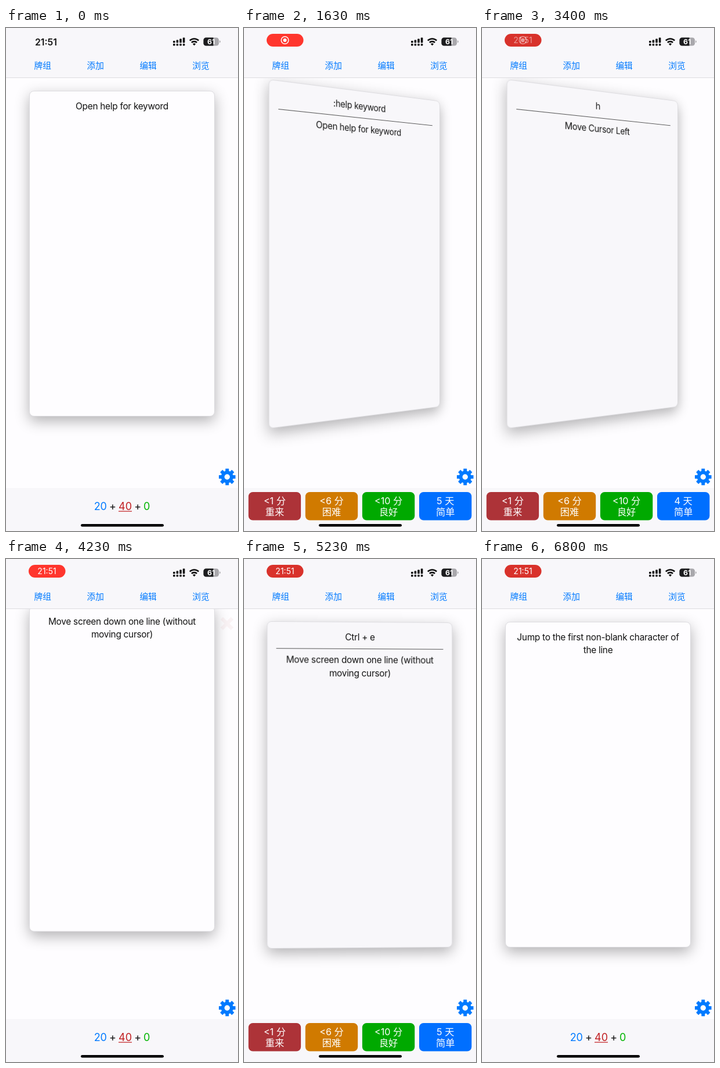
An HTML page that plays this animation: 400x865 px, repeating every 6830 ms.

```html
<!DOCTYPE html>
<html lang="zh-CN">
<head>
<meta charset="utf-8">
<title>Flashcards</title>
<style>
html, body { margin: 0; width: 100%; height: 100%; overflow: hidden; background: #fefdff; }
#stage { position: absolute; left: 0; top: 0; width: 400px; height: 865px; overflow: hidden;
  font-family: Inter, "Noto Sans CJK SC", "Noto Sans CJK", sans-serif; }
.card { position: absolute; left: 40px; top: 107.5px; width: 320px; height: 560.5px; box-sizing: border-box;
  padding: 15px; border: 1px solid #dddce0; border-radius: 8px; background: #fefdff;
  box-shadow: 0 8px 24px rgba(0,0,0,.3); color: #111; text-align: center;
  font-size: 15.4px; line-height: 22.4px; letter-spacing: -.28px; }
.card.back { background: #f8f7fa; }
.card hr { margin: 7.5px 0 8px; border: 0; height: 1.2px; background: #555; }
.card:not(.back) .answer { display: none; }
svg { position: absolute; left: 0; top: 0; }
text { text-anchor: middle; }
.nav { font-size: 14.7px; fill: #007aff; }
.count { font-size: 18px; }
.btn { font-size: 16.2px; fill: #fff; }
</style>
</head>
<body>
<div id="stage">
  <div id="old" class="card"></div>
  <div id="now" class="card"></div>
  <svg width="400" height="865" viewBox="0 0 400 865">
    <path id="cross" d="M372 102l18 18m0-18l-18 18" stroke="#b52b2f" stroke-width="6.4"/>
    <path id="gear" fill="#007aff" fill-rule="evenodd"/>
    <rect width="400" height="85" fill="#f8f7fa"/>
    <rect y="85" width="400" height="1" fill="#dddce0"/>
    <rect y="791" width="400" height="74" fill="#f8f7fa"/>
    <g id="nav" class="nav"></g>

    <text id="clock" x="69" y="29.8" font-size="15.8" font-weight="600" fill="#111">21:51</text>
    <g id="pill">
      <rect id="pillBg" x="39" y="10" width="63.5" height="22" rx="11"/>
      <g id="rec" fill="none" stroke="#fff" stroke-width="1.5">
        <circle cx="70.5" cy="21" r="6.3"/><circle cx="70.5" cy="21" r="3" fill="#fff" stroke="none"/>
      </g>
      <text id="pillTime" x="70.5" y="26" font-size="14" fill="#fff">21:51</text>
    </g>
    <g id="signal" fill="#111"></g>
    <g fill="none" stroke="#111" stroke-width="2.6">
      <path d="M316.8 21.6a11 11 0 0 1 15.4 0"/>
      <path d="M319.9 25a6.6 6.6 0 0 1 9.2 0"/>
      <path d="M324.5 30.2l-2.6-2.8a3.8 3.8 0 0 1 5.2 0z" fill="#111" stroke="none"/>
    </g>
    <clipPath id="cell"><rect x="340.5" y="16.5" width="26.5" height="14" rx="4.3"/></clipPath>
    <g clip-path="url(#cell)">
      <rect x="340" y="16" width="28" height="15" fill="#a9a8ac"/>
      <rect x="340" y="16" width="17.5" height="15" fill="#1c1c1e"/>
    </g>
    <path d="M368 21.3q1.8.6 1.8 2.2t-1.8 2.2z" fill="#a9a8ac"/>
    <text x="353.6" y="28" font-size="12.4" font-weight="700" fill="#fff">61</text>

    <g id="counter" class="count">
      <text x="162.8" y="829" fill="#007aff">20</text>
      <text x="184" y="829" fill="#111">+</text>
      <text x="205.5" y="829" fill="#c11f22">40</text>
      <rect x="194" y="830.5" width="23" height="1.2" fill="#c11f22"/>
      <text x="227.3" y="829" fill="#111">+</text>
      <text x="242.8" y="829" fill="#00b400">0</text>
    </g>
    <g id="buttons"></g>
    <rect x="129" y="853" width="143" height="4.6" rx="2.3" fill="#000"/>
  </svg>
</div>
<script>
const LOOP = 6830, SLIDE = 600, FLIP = 700;
const deck = [
  { q: 'Open help for keyword', a: ':help keyword', days: 5, enter: -SLIDE, flip: 1210 },
  { q: 'Move Cursor Left', a: 'h', days: 4, enter: 2123, flip: 2980 },
  { q: 'Move screen down one line (without moving cursor)', a: 'Ctrl + e', days: 5, enter: 3785, flip: 4540 },
  { q: 'Jump to the first non-blank character of the line', a: '^', days: 5, enter: 5650, flip: Infinity }
];
const $ = id => document.getElementById(id);
const clamp = v => Math.max(0, Math.min(1, v));
const show = (el, on) => { el.style.display = on ? '' : 'none'; };

function bezier(x1, y1, x2, y2) {
  const at = (u, a, b) => 3 * u * (1 - u) * ((1 - u) * a + u * b) + u * u * u;
  return x => {
    if (x <= 0 || x >= 1) return clamp(x);
    let lo = 0, hi = 1;
    for (let i = 0; i < 30; i++) {
      const mid = (lo + hi) / 2;
      if (at(mid, x1, x2) < x) lo = mid; else hi = mid;
    }
    return at(lo, y1, y2);
  };
}
const ease = bezier(.25, .1, .25, 1);
const spring = bezier(.175, .885, .32, 1.38);

function gearPath(cx, cy) {
  const pts = [];
  for (let i = 0; i < 8; i++) {
    for (const [r, d] of [[10.6, -.29], [14.6, -.2], [14.6, .2], [10.6, .29]]) {
      const a = i * Math.PI / 4 + d;
      pts.push((cx + r * Math.cos(a)).toFixed(2) + ' ' + (cy + r * Math.sin(a)).toFixed(2));
    }
  }
  const h = 4.7;
  return `M${pts.join('L')}Z M${cx - h} ${cy}a${h} ${h} 0 1 0 ${2 * h} 0a${h} ${h} 0 1 0 ${-2 * h} 0Z`;
}

$('gear').setAttribute('d', gearPath(381.3, 772));
$('nav').innerHTML = ['牌组', '添加', '编辑', '浏览']
  .map((s, i) => `<text x="${63.3 + 90.9 * i}" y="70.2">${s}</text>`).join('');
$('signal').innerHTML = [3.5, 5, 7, 9].map((h, i) => {
  const x = 288 + 5.6 * i;
  return `<rect x="${x}" y="${25.5 - h}" width="3.6" height="${h}" rx="1"/>` +
    `<rect x="${x}" y="27" width="3.6" height="3.5" rx="1"/>`;
}).join('');
$('buttons').innerHTML = [
  ['<1 分', '重来', '#ad3338'], ['<6 分', '困难', '#d07a00'],
  ['<10 分', '良好', '#00a900'], ['5 天', '简单', '#006fff']
].map(([time, name, fill], i) => {
  const x = 7.7 + 98.1 * i, c = x + 45.2;
  return `<rect x="${x}" y="798" width="90.4" height="48.5" rx="7.5" fill="${fill}"/>` +
    `<g class="btn"><text x="${c}" y="818.5">${time.replace('<', '&lt;')}</text>` +
    `<text x="${c}" y="838">${name}</text></g>`;
}).join('');
const days = $('buttons').querySelector('g:last-child text');

function place(el, card, x, y, angle) {
  const back = angle > 90;
  if (el.card !== card) {
    el.card = card;
    el.innerHTML = `<div class="answer">${card.a}<hr></div>${card.q}`;
  }
  el.classList.toggle('back', back);
  const turn = back ? angle - 180 : angle;
  el.style.transform = `translate(${x}px,${y}px)` + (turn ? ` perspective(945px) rotateY(${turn}deg)` : '');
}

function drawPill(t) {
  const shown = clamp((t - 60) / 300), swap = clamp((t - 3280) / 240);
  const dark = t < 2530 ? 0 : (1 - Math.cos((t - 2530) / 1740 * 2 * Math.PI)) / 2;
  const mix = (a, b) => Math.round(a + (b - a) * dark);
  $('clock').style.opacity = 1 - shown;
  $('pill').style.opacity = shown;
  $('pillBg').setAttribute('fill', `rgb(${mix(255, 216)},${mix(54, 50)},${mix(45, 43)})`);
  $('rec').style.opacity = 1 - swap;
  $('pillTime').style.opacity = swap;
}

function draw(t) {
  let i = deck.length - 1;
  while (t < deck[i].enter) i--;
  const card = deck[i], s = clamp((t - card.enter) / SLIDE), p = ease(s);
  const flipped = t >= card.flip;
  place($('now'), card, 0, -650 * (1 - p), 180 * spring(clamp((t - card.flip) / FLIP)));
  const leaving = i > 0 && s < 1;
  show($('old'), leaving);
  if (leaving) place($('old'), deck[i - 1], -400 * p, 0, 180);
  $('cross').style.opacity = leaving ? clamp((.77 - s) * 1.6) : 0;
  show($('buttons'), flipped);
  show($('counter'), !flipped);
  days.textContent = card.days + ' 天';
  drawPill(t);
}

const start = performance.now();
function tick() {
  draw((performance.now() - start) % LOOP);
  requestAnimationFrame(tick);
}
tick();
</script>
</body>
</html>
```
